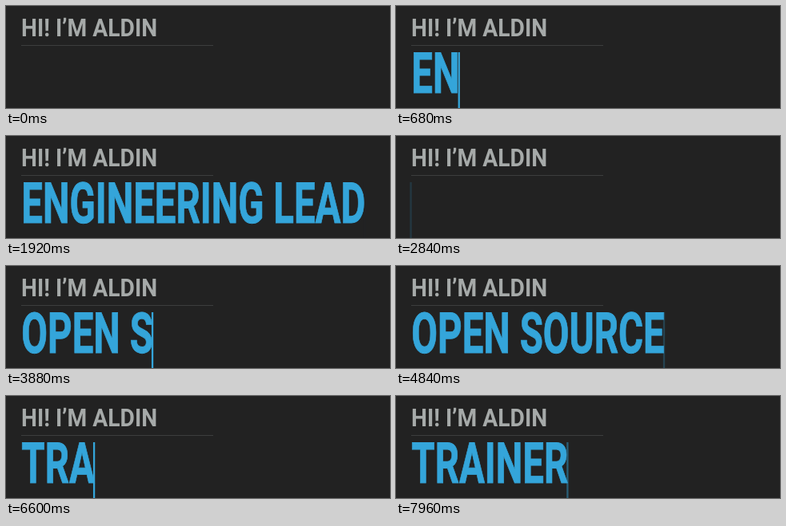
An HTML page for the animation above (8000 ms loop, 480 by 128 pixels).

```html
<!DOCTYPE html>
<html lang="en">
<head>
<meta charset="utf-8">
<title>Typed roles</title>
<style>
  html, body { margin: 0; width: 100%; height: 100%; overflow: hidden; background: #222; }
  svg { display: block; }
  text { font: 700 71px Roboto, "Liberation Sans", sans-serif; white-space: pre; text-rendering: geometricPrecision; }
  #title { font-size: 31px; fill: #a6aaa9; }
  #role { fill: #34a5da; stroke: #34a5da; stroke-width: .9px; }
</style>
</head>
<body>
<svg width="480" height="128" viewBox="0 0 480 128">
  <text id="title" transform="translate(19 38) scale(.91 1)">HI! I’M ALDIN</text>
  <rect x="19" y="49" width="240" height="1" fill="#3c3e3e"/>
  <text id="role" transform="translate(19.3 109.4) scale(.668 1)" xml:space="preserve"></text>
  <rect id="caret" y="58" width="2.3" height="70" fill="#34a5da"/>
</svg>
<script>
const LOOP = 8000, BLINK = 1100, CONDENSE = 0.668;
const role = document.getElementById('role');
const caret = document.getElementById('caret');

// start: first key, step: ms per key, rest: blinking begins, erase: first deletion, back: ms per deletion
const phrases = [
  { text: 'ENGINEERING LEAD', start: 613, step: 53.3, rest: 1440, erase: 2340, back: 13 },
  { text: 'OPEN SOURCE', start: 3435, step: 76, rest: 4190, erase: 5110, back: 16 },
  { text: 'TRAINER', start: 6360, step: 117, rest: 7260, erase: Infinity, back: 16 }
];

const clamp = (v, lo, hi) => Math.min(hi, Math.max(lo, v));

// CSS "ease": cubic-bezier(.25, .1, .25, 1)
function ease(x) {
  let lo = 0, hi = 1, s = 0.5;
  for (let i = 0; i < 20; i++) {
    s = (lo + hi) / 2;
    const bx = 0.75 * s * (1 - s) + s ** 3;
    if (bx < x) lo = s; else hi = s;
  }
  return 0.3 * s * (1 - s) ** 2 + 3 * s * s * (1 - s) + s ** 3;
}

function blink(elapsed) {
  const p = (elapsed % BLINK) / BLINK * 2;
  return p < 1 ? 1 - ease(p) : ease(p - 1);
}

function stateAt(t) {
  let emptySince = -550;
  for (const { text, start, step, rest, erase, back } of phrases) {
    const n = text.length, end = erase + n * back;
    if (t < start - 40) return ['', blink(t - emptySince)];
    if (t < erase) {
      const typed = clamp(Math.floor((t - start) / step) + 1, 0, n);
      return [text.slice(0, typed), t < rest ? 1 : blink(t - rest)];
    }
    if (t < end) return [text.slice(0, n - 1 - Math.floor((t - erase) / back)), 1];
    emptySince = end;
  }
}

function draw(now) {
  const [text, opacity] = stateAt(now % LOOP);
  if (role.textContent !== text) role.textContent = text;
  const width = text ? role.getComputedTextLength() * CONDENSE : 0;
  caret.setAttribute('x', 17.4 + width);
  caret.setAttribute('opacity', opacity);
}

let origin;
function tick(now) {
  origin ??= now;
  draw(now - origin);
  requestAnimationFrame(tick);
}
draw(0);
requestAnimationFrame(tick);
</script>
</body>
</html>
```
